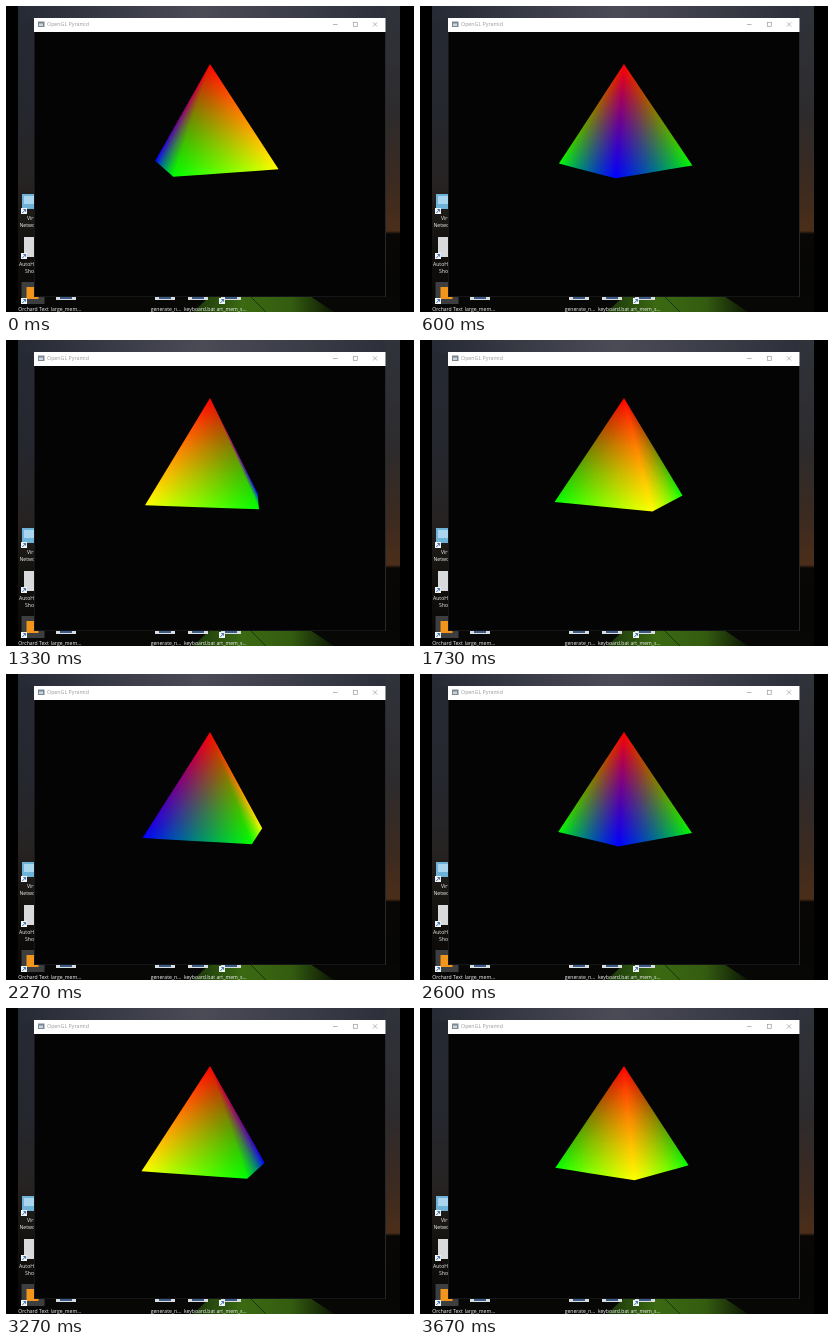
Write an HTML page with a canvas that moves like this. It is 408 px wide and 306 px high and loops after 3.74 s.

```html
<!DOCTYPE html>
<html lang="en">
<head>
<meta charset="utf-8">
<title>Pyramid</title>
<style>
  html, body { margin: 0; width: 100%; height: 100%; overflow: hidden; background: #000; }
  svg, canvas { position: absolute; left: 0; top: 0; width: 408px; height: 306px; }
  text { font-family: "Open Sans", "Noto Sans", sans-serif; font-size: 5.1px; fill: #f4f4f4; }
  .mid { text-anchor: middle; }
  .title { font-size: 5.3px; fill: #9a9a9a; }
</style>
</head>
<body>
<svg viewBox="0 0 408 306">
  <defs>
    <linearGradient id="sky" x2="0" y2="1">
      <stop offset="0" stop-color="#262a34"/>
      <stop offset=".35" stop-color="#25272e"/>
      <stop offset=".58" stop-color="#262322"/>
      <stop offset=".75" stop-color="#15130f"/>
      <stop offset="1" stop-color="#060606"/>
    </linearGradient>
    <linearGradient id="dusk" x2="0" y2="1">
      <stop offset="0" stop-color="#30333b"/>
      <stop offset=".35" stop-color="#2d2b2d"/>
      <stop offset=".58" stop-color="#3b2a20"/>
      <stop offset=".735" stop-color="#4b2e19"/>
      <stop offset=".745" stop-color="#080706"/>
      <stop offset="1" stop-color="#060605"/>
    </linearGradient>
    <linearGradient id="haze">
      <stop offset="0" stop-color="#54535f" stop-opacity="0"/>
      <stop offset=".48" stop-color="#54535f" stop-opacity=".8"/>
      <stop offset="1" stop-color="#54535f" stop-opacity=".1"/>
    </linearGradient>
    <linearGradient id="tent">
      <stop offset="0" stop-color="#1b360b"/>
      <stop offset=".35" stop-color="#3b6a12"/>
      <stop offset=".7" stop-color="#345c10"/>
      <stop offset="1" stop-color="#0c1604"/>
    </linearGradient>
    <g id="link">
      <rect width="6" height="6" fill="#f2f4f6"/>
      <path d="M1.3 5 4.4 1.8M2.4 1.5H4.6V3.7" fill="none" stroke="#2a62a8" stroke-width=".9"/>
    </g>
    <g id="file">
      <rect width="20" height="10" fill="#d9dde0"/>
      <rect x="4" y="5" width="12" height="4" fill="#3c5a86"/>
    </g>
  </defs>

  <rect width="408" height="306"/>
  <rect x="12" width="382" height="306" fill="url(#sky)"/>
  <rect x="12" width="382" height="13" fill="url(#haze)"/>
  <rect x="379" width="15" height="306" fill="url(#dusk)"/>
  <rect x="40" y="290" width="354" height="16" fill="#070806"/>
  <path d="M187 306 204 290H304L328 306Z" fill="url(#tent)"/>
  <path d="M244 290 260 306" stroke="#1c340b"/>

  <rect x="16" y="188" width="13" height="15" fill="#6fb2d8"/>
  <rect x="18" y="190" width="11" height="8" fill="#a9d6ee"/>
  <use href="#link" x="15" y="202"/>
  <text x="21" y="214">Virtual</text>
  <text x="13.5" y="220.5">Network</text>

  <rect x="18" y="231" width="12" height="20" fill="#d8dadc"/>
  <use href="#link" x="15" y="247"/>
  <text x="13" y="260">AutoHotkey</text>
  <text x="19" y="266.5">Shortcut</text>

  <rect x="15.5" y="276" width="23" height="22" fill="#3d3e3f"/>
  <rect x="20.5" y="281" width="12" height="12" fill="#f2951d"/>
  <use href="#link" x="15" y="292"/>
  <use href="#file" x="50" y="284"/>
  <use href="#file" x="149" y="284"/>
  <use href="#file" x="182" y="284"/>
  <use href="#file" x="215" y="284"/>
  <use href="#link" x="213" y="292"/>
  <g class="mid">
    <text x="27.5" y="304.5">Orchard Text</text>
    <text x="60" y="304.5">large_mem...</text>
    <text x="160" y="304.5">generate_n...</text>
    <text x="193.5" y="304.5">keyboard.bat</text>
    <text x="225.5" y="304.5">art_mem_s...</text>
  </g>

  <rect x="28" y="12" width="352" height="279" fill="#25282b"/>
  <rect x="28" y="12" width="351.5" height="14" fill="#fff"/>
  <rect x="28.5" y="26" width="350.5" height="264.5" fill="#040404"/>
  <rect x="32" y="15.5" width="6.5" height="5.5" fill="#7c8790"/>
  <rect x="33" y="17.5" width="4" height="2.5" fill="#c4d6e2"/>
  <text class="title" x="41" y="20.4">OpenGL Pyramid</text>
  <g fill="none" stroke="#999" stroke-width=".7">
    <path d="M327 18.5h4.5M367 16.3l4.2 4.2M371.2 16.3l-4.2 4.2"/>
    <rect x="347.3" y="16.3" width="4" height="4"/>
  </g>
</svg>
<canvas id="view" width="408" height="306"></canvas>

<script>
const ctx = document.getElementById('view').getContext('2d');
const LOOP = 3740, RAD = Math.PI / 180;

// [step, degrees]: about twelve degrees per step, slightly uneven
const TURN = [[0, -24.5], [9, 84.7], [15, 153.3], [26, 288.5], [34, 388.5], [43, 493], [55, 636.6]];
const APEX = { x: 0, y: -62.5, z: 0, rgb: [255, 0, 0] };
const BASE = [[0, 255, 0], [255, 255, 0], [0, 255, 0], [0, 0, 255]];

function stepAt(t) {
  let k = Math.round(t * 0.015);
  while (Math.round(k * 20 / 3) * 10 > t) k--;
  return Math.min(k, 55);
}

function angleAt(k) {
  const i = Math.max(1, TURN.findIndex(p => p[0] >= k));
  const [k0, a0] = TURN[i - 1], [k1, a1] = TURN[i];
  return a0 + (a1 - a0) * (k - k0) / (k1 - k0);
}

function project(p) {
  const s = 1 / (1 - 0.268 * p.z);
  return [204 + 67 * p.x * s, 120.5 + p.y * s];
}

const cross = (a, b, c) =>
  (b[0] - a[0]) * (c[1] - a[1]) - (b[1] - a[1]) * (c[0] - a[0]);

const middle = (a, b) => ({
  x: (a.x + b.x) / 2, y: (a.y + b.y) / 2, z: (a.z + b.z) / 2,
  rgb: a.rgb.map((v, i) => (v + b.rgb[i]) / 2)
});

// Each corner's colour fades to black at the opposite edge; the sum blends all three.
function shade(corners) {
  const pts = corners.map(project);
  corners.forEach((corner, i) => {
    const p = pts[i], q = pts[(i + 1) % 3], r = pts[(i + 2) % 3];
    const dx = r[0] - q[0], dy = r[1] - q[1];
    const u = ((p[0] - q[0]) * dx + (p[1] - q[1]) * dy) / (dx * dx + dy * dy);
    const fade = ctx.createLinearGradient(p[0], p[1], q[0] + u * dx, q[1] + u * dy);
    fade.addColorStop(0, `rgb(${corner.rgb.map(Math.round)})`);
    fade.addColorStop(1, '#000');
    ctx.fillStyle = fade;
    ctx.beginPath();
    pts.forEach(v => ctx.lineTo(v[0], v[1]));
    ctx.fill();
  });
}

// Splitting in space keeps the blend correct in perspective.
function face(a, b, c, depth) {
  if (!depth) return shade([a, b, c]);
  const ab = middle(a, b), bc = middle(b, c), ca = middle(c, a);
  face(a, ab, ca, depth - 1);
  face(ab, b, bc, depth - 1);
  face(ca, bc, c, depth - 1);
  face(ab, bc, ca, depth - 1);
}

function draw(angle) {
  ctx.clearRect(0, 0, 408, 306);
  ctx.globalCompositeOperation = 'lighter';
  const ring = BASE.map((rgb, i) => {
    const a = (angle + 90 * i) * RAD;
    return { x: Math.sin(a), y: 38, z: Math.cos(a), rgb };
  });
  ring.forEach((left, i) => {
    const right = ring[(i + 1) % 4];
    if (cross(project(APEX), project(right), project(left)) > 1) face(APEX, right, left, 2);
  });
}

const start = performance.now();
let shown = -1;
function tick() {
  const k = stepAt((performance.now() - start) % LOOP);
  if (k !== shown) draw(angleAt(shown = k));
  requestAnimationFrame(tick);
}
tick();
</script>
</body>
</html>
```
